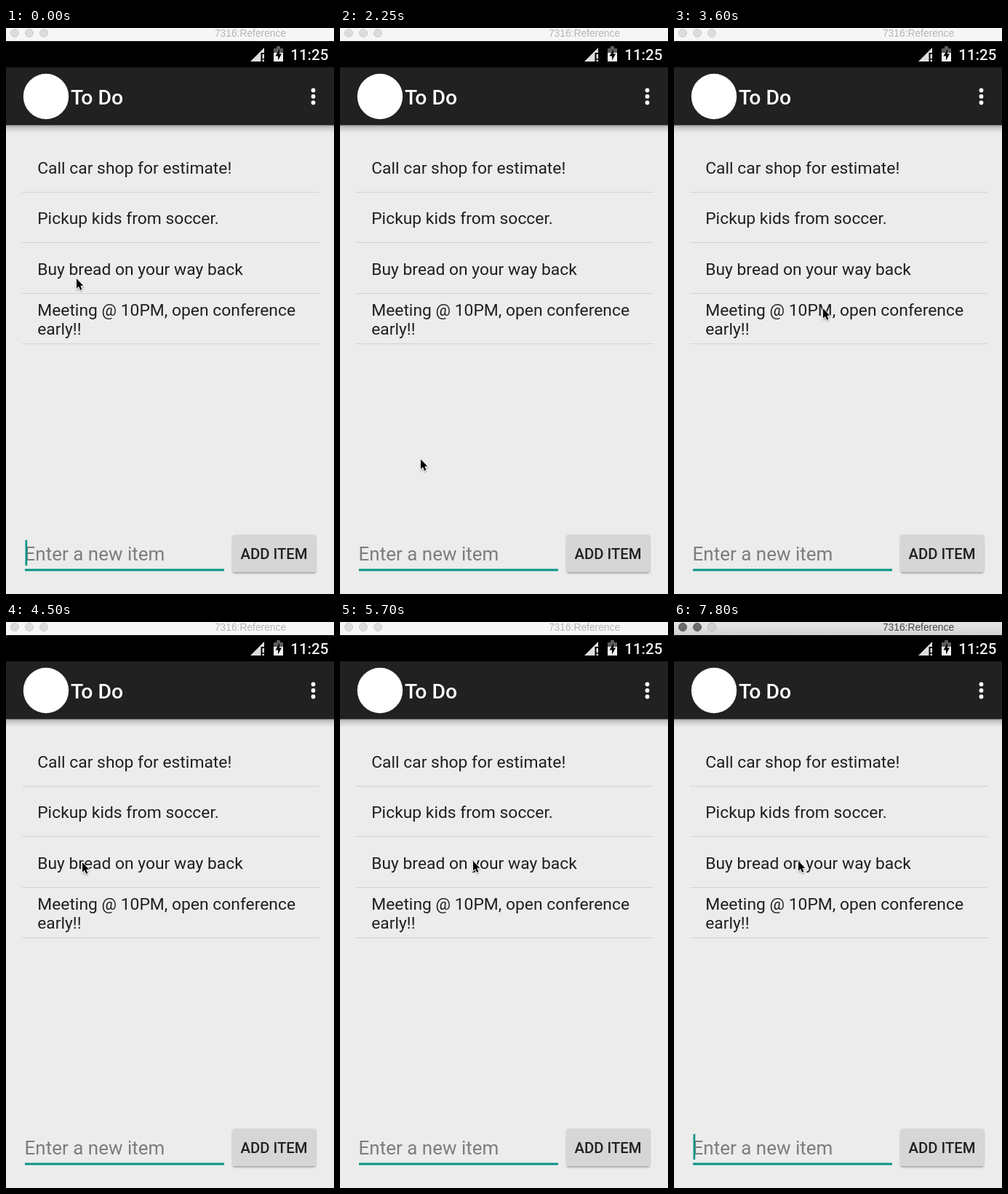
An HTML page for the animation above (8000 ms loop, 451 by 777 pixels).

```html
<!DOCTYPE html>
<html lang="en">
<head>
<meta charset="utf-8">
<title>To Do</title>
<style>
  html, body { margin: 0; width: 100%; height: 100%; overflow: hidden; background: #ececec; }
  svg { display: block; width: 451px; height: 777px; font-family: Roboto, sans-serif; }
  .list { font-size: 22.87px; fill: #1f1f1f; }
  .medium { font-weight: 500; }
  #heading { font: 13.8px "Liberation Sans", sans-serif; text-anchor: middle; fill: #b5b5b5; }
  #dots { fill: #dcdcdc; stroke: #cecece; }
  .active #heading { fill: #484848; }
  .active #bar { fill: url(#metal); }
  .active #dots { fill: #6c6c6c; stroke: #5c5c5c; }
  .active #dots :last-child { fill: #cfcfcf; stroke: #b5b5b5; }
</style>
</head>
<body>
<svg id="stage" viewBox="0 0 451 777">
  <defs>
    <linearGradient id="metal" x2="0" y2="1">
      <stop stop-color="#e6e6e6"/><stop offset="1" stop-color="#d2d2d2"/>
    </linearGradient>
    <linearGradient id="shade" x2="0" y2="1">
      <stop stop-color="#000" stop-opacity=".27"/>
      <stop offset=".4" stop-color="#000" stop-opacity=".12"/>
      <stop offset="1" stop-color="#000" stop-opacity="0"/>
    </linearGradient>
    <filter id="soft" x="-20%" y="-20%" width="140%" height="150%">
      <feDropShadow dx="0" dy="1.5" stdDeviation="1.2" flood-opacity=".35"/>
    </filter>
  </defs>
  <rect width="451" height="777" fill="#ececec"/>

  <!-- window bar -->
  <rect id="bar" width="451" height="18" fill="#f6f6f6"/>
  <g id="dots">
    <circle cx="12" cy="7" r="5.5"/><circle cx="32" cy="7" r="5.5"/><circle cx="52" cy="7" r="5.5"/>
  </g>
  <text id="heading" x="336" y="12">7316:Reference</text>

  <!-- status bar -->
  <rect y="18" width="451" height="36"/>
  <path d="M336 46 355 27V34H350.5V46Z" fill="#dedede"/>
  <path d="M352.5 36h2.5v6h-2.5zm0 7.5h2.5v2.5h-2.5z" fill="#e6e6e6"/>
  <path d="M372 25h5v3h4v8h-13v-8h4z" fill="#5c5c5c"/>
  <path d="M368 34h13v12h-13z" fill="#f2f2f2"/>
  <path d="M376 29 370.5 38.5H374V44.5L379 35.5H376Z"/>
  <text class="medium" x="391.3" y="44" font-size="20.5" fill="#f0f0f0">11:25</text>

  <!-- app bar -->
  <rect y="133.5" width="451" height="11" fill="url(#shade)"/>
  <rect y="54" width="451" height="79.5" fill="#212121"/>
  <circle cx="55" cy="94" r="31.2" fill="#fff"/>
  <text class="medium" x="88.9" y="105" font-size="28.4" fill="#fff">To Do</text>
  <g fill="#fff">
    <circle cx="422.5" cy="85.5" r="2.9"/><circle cx="422.5" cy="94" r="2.9"/><circle cx="422.5" cy="102.5" r="2.9"/>
  </g>

  <!-- list -->
  <g class="list">
    <text x="43.2" y="200">Call car shop for estimate!</text>
    <text x="43.2" y="269">Pickup kids from soccer.</text>
    <text x="43.2" y="338.5">Buy bread on your way back</text>
    <text x="43.2" y="394.5">Meeting @ 10PM, open conference</text>
    <text x="43.2" y="421">early!!</text>
  </g>
  <path d="M22 225.5H431M22 294.5H431M22 364.5H431M22 433.5H431" stroke="#d2d2d2"/>

  <!-- entry -->
  <text x="25.5" y="731" font-size="26" fill="#7d7d7d">Enter a new item</text>
  <rect x="26" y="742.5" width="274" height="3" fill="#089587"/>
  <rect id="caret" x="26.5" y="703" width="2.7" height="35" fill="#089587"/>
  <rect x="311.5" y="695.5" width="114.5" height="51.5" rx="3" fill="#d6d6d6" filter="url(#soft)"/>
  <text class="medium" x="322.5" y="729" font-size="20.3" fill="#212121">ADD ITEM</text>

  <path id="pointer" d="M0 0V13.5L3 10.7 5.2 15.7 7.5 14.7 5.3 9.8H9.3Z"
        stroke="#fff" stroke-width="1.6" paint-order="stroke" filter="url(#soft)"/>
</svg>
<script>
  const LOOP = 8000, STEP = 150, MOVE = 600, BLINK = 1025, ACTIVATE = 6600;
  // pointer stops: arrival time, x, y; it rests, then travels for at most MOVE
  const stops = [
    [0, 97, 344], [150, 105, 342], [1200, 143, 337], [1950, 96, 603], [2700, 192, 531],
    [3600, 205, 385], [4200, 108, 309], [4500, 105, 330], [5250, 177, 330],
    [5550, 194, 327], [5850, 171, 328]
  ];
  const [stage, caret, pointer] = ["stage", "caret", "pointer"].map(id => document.getElementById(id));
  const smooth = k => k * k * (3 - 2 * k);

  function tipAt(t) {
    const i = stops.findIndex(stop => stop[0] > t);
    if (i < 0) return stops.at(-1).slice(1);
    const [left, x0, y0] = stops[i - 1], [arrive, x1, y1] = stops[i];
    const span = Math.min(MOVE, arrive - left);
    const k = smooth(Math.max(0, 1 - (arrive - t) / span));
    return [x0 + (x1 - x0) * k, y0 + (y1 - y0) * k].map(Math.round);
  }

  function draw(now) {
    const t = Math.floor(now % LOOP / STEP) * STEP;
    const [x, y] = tipAt(t);
    const phase = (t + BLINK - 100) % BLINK;
    pointer.setAttribute("transform", `translate(${x} ${y})`);
    caret.style.visibility = phase > BLINK / 2 ? "visible" : "hidden";
    stage.classList.toggle("active", t >= ACTIVATE);
  }

  const start = performance.now();
  function tick() {
    draw(performance.now() - start);
    requestAnimationFrame(tick);
  }
  tick();
</script>
</body>
</html>
```
